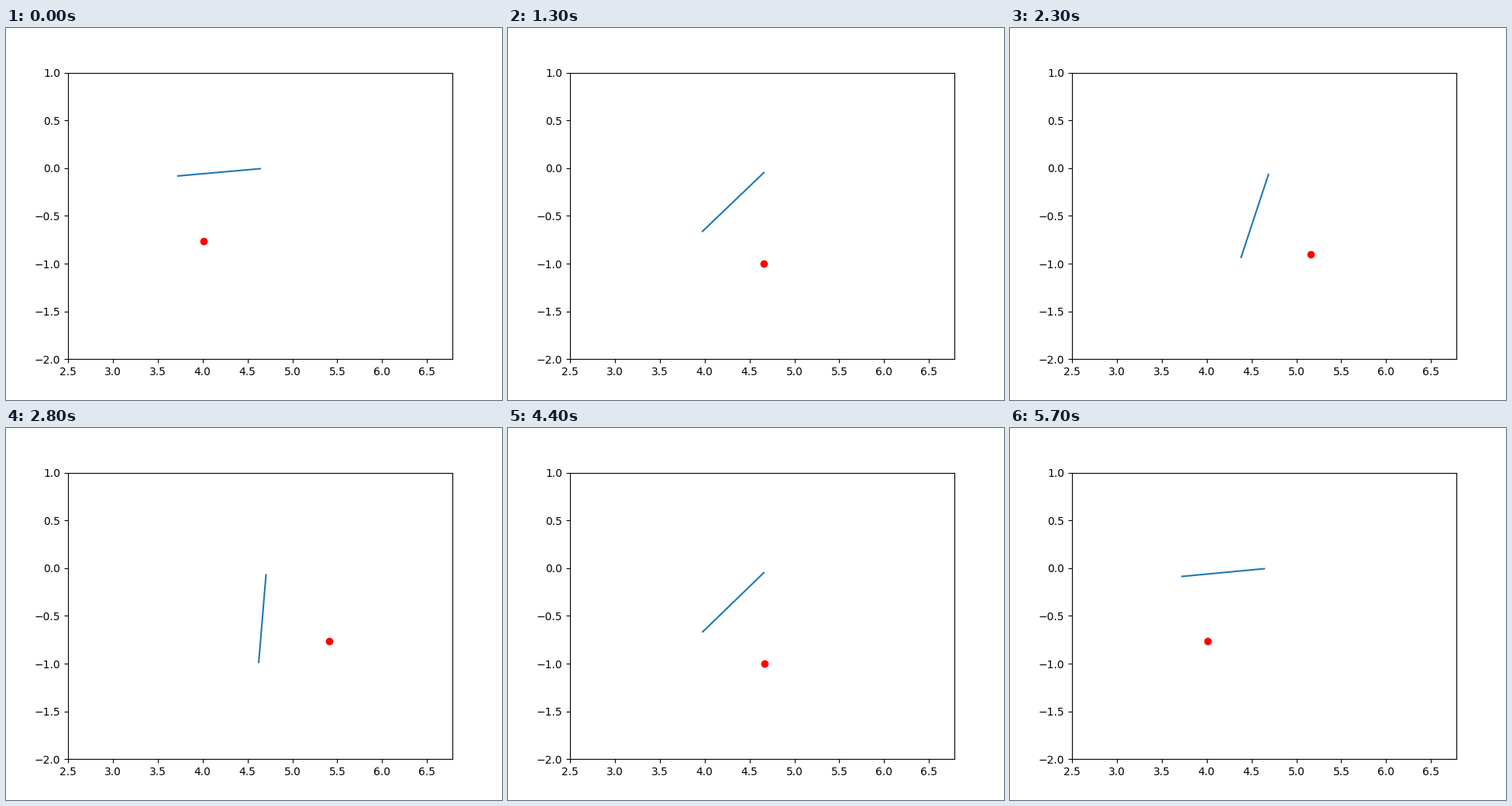
These frames come from a looping animation (640x480 px, 5800 ms). A matplotlib script:

```python
import numpy as np
import matplotlib.pyplot as plt
from matplotlib.animation import FuncAnimation

CENTER = 1.5 * np.pi
SWING = 0.7026
STEP = 0.05

# Sweep right, then back from the far end.
there = np.arange(-SWING, SWING, STEP)
offsets = np.concatenate([there, -there])

fig, ax = plt.subplots(figsize=(6.4, 4.8), dpi=100)
ax.set_xlim(2.5, 2 * np.pi + 0.5)
ax.set_ylim(-2, 1)

rod, = ax.plot([], [])
dot, = ax.plot([], [], "ro")

# Rod along the diagonal, pivoting about (CENTER, 0).
radii = np.sqrt(2) * np.array([0.7, 0.05])


def update(i):
    off = offsets[i]
    angle = np.pi / 4 + off
    rod.set_data(CENTER - radii * np.cos(angle), -radii * np.sin(angle))
    x = CENTER + off
    dot.set_data([x], [np.sin(x)])
    return rod, dot


anim = FuncAnimation(fig, update, frames=len(offsets), interval=100,
                     repeat=True, repeat_delay=0)
plt.show()
```
